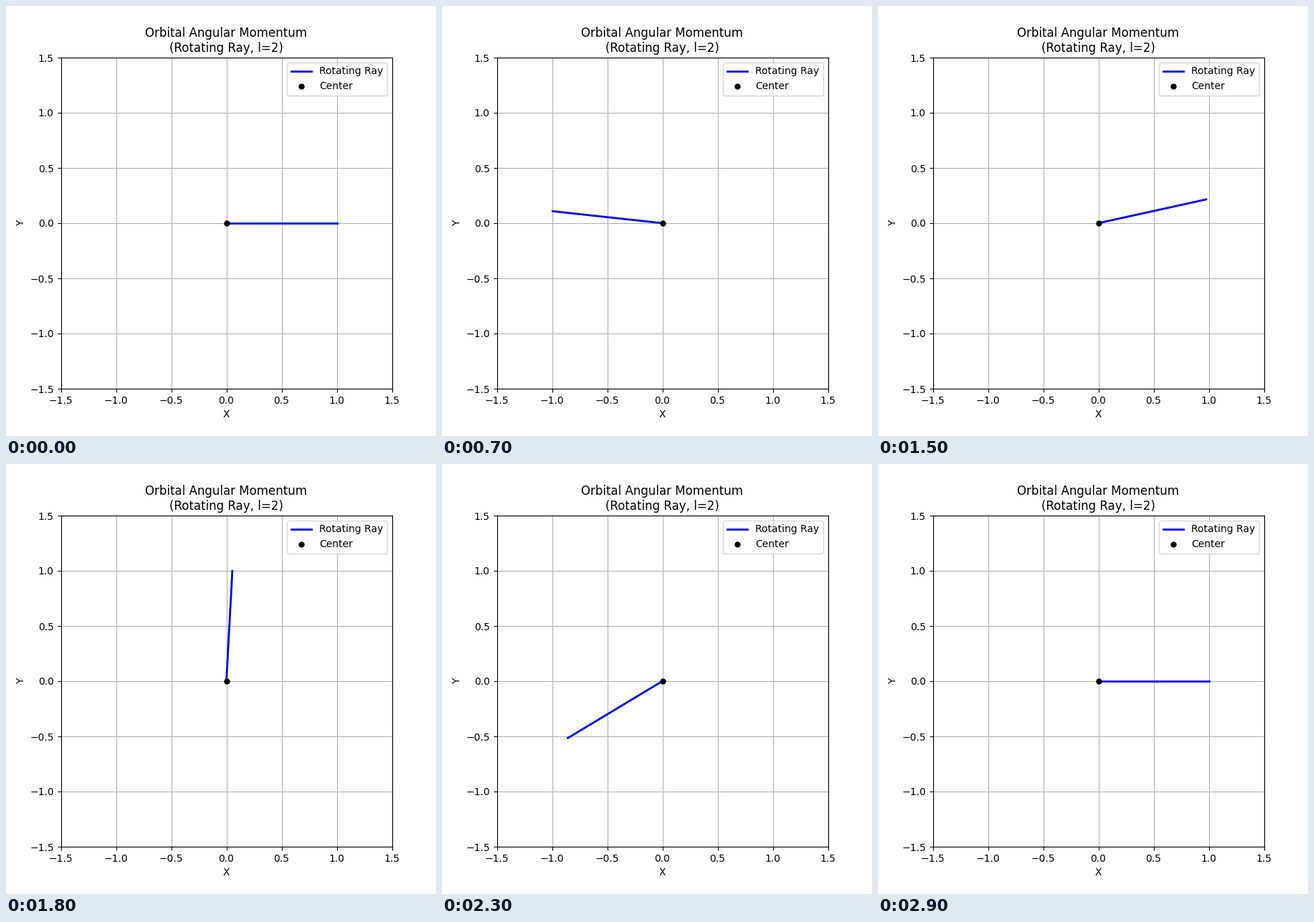
Animation of 600 by 600 pixels, one loop 3000 ms. Source, as a matplotlib script:

```python
import numpy as np
import matplotlib.pyplot as plt
from matplotlib.animation import FuncAnimation

FRAMES = 30
INTERVAL = 100  # ms
L = 2  # full turns per loop

angles = L * np.linspace(0, 2 * np.pi, FRAMES)

fig, ax = plt.subplots(figsize=(6, 6), dpi=100)
ax.set_xlim(-1.5, 1.5)
ax.set_ylim(-1.5, 1.5)
ax.set_aspect("equal")
ax.grid(True)
ax.set_xlabel("X")
ax.set_ylabel("Y")
ax.set_title(f"Orbital Angular Momentum\n(Rotating Ray, l={L})")

ray, = ax.plot([0, 1], [0, 0], "b-", lw=2, label="Rotating Ray")
ax.plot(0, 0, "ko", markersize=5, label="Center")
ax.legend(loc="upper right")


def update(i):
    a = angles[i]
    ray.set_data([0, np.cos(a)], [0, np.sin(a)])
    return ray,


anim = FuncAnimation(fig, update, frames=FRAMES, interval=INTERVAL, repeat=True)
plt.show()
```
